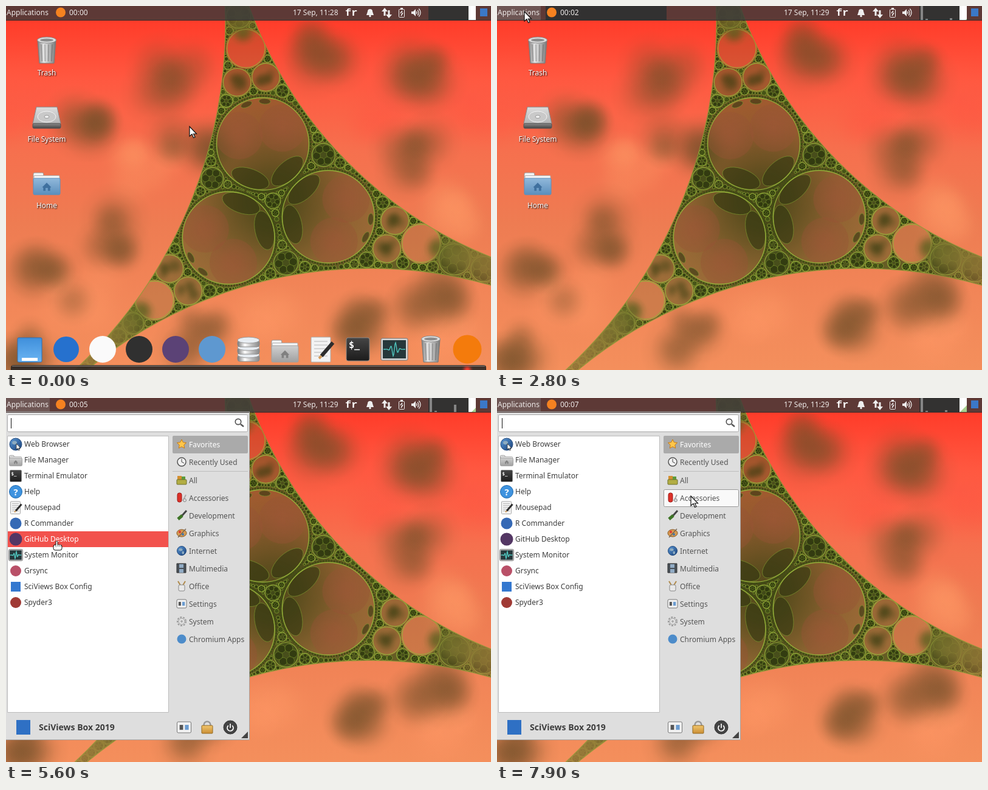
An HTML page with a canvas for the animation above (8000 ms loop, 798 px wide and 598 px high).

```html
<!DOCTYPE html>
<html lang="en">
<head>
<meta charset="utf-8">
<title>Desktop menu</title>
<style>
html, body { margin: 0; width: 100%; height: 100%; overflow: hidden; background: #444; }
canvas { display: block; }
</style>
</head>
<body>
<canvas id="stage" width="798" height="598"></canvas>
<script>
const W = 798, H = 598, LOOP = 8000, STEP = 50, TAU = 2 * Math.PI;
let g = document.getElementById('stage').getContext('2d');

// ---------- helpers ----------
function layer(draw) {
  const canvas = document.createElement('canvas'), previous = g;
  canvas.width = W; canvas.height = H;
  g = canvas.getContext('2d');
  draw();
  g = previous;
  return canvas;
}
function paint(fill, stroke, width = 1) {
  if (fill) { g.fillStyle = fill; g.fill(); }
  if (stroke) { g.strokeStyle = stroke; g.lineWidth = width; g.stroke(); }
}
function rect(x, y, w, h, fill, stroke, r = 0) {
  g.beginPath(); g.roundRect(x, y, w, h, r); paint(fill, stroke);
}
function oval(x, y, rx, ry, fill, stroke, turn = 0, width = 1) {
  g.beginPath(); g.ellipse(x, y, rx, ry, turn, 0, TAU); paint(fill, stroke, width);
}
const disc = (x, y, r, fill, stroke, width) => oval(x, y, r, r, fill, stroke, 0, width);
function arc(x, y, r, from, to, color, width) {
  g.beginPath(); g.arc(x, y, r, from, to); paint(null, color, width);
}
function poly(x, y, points, fill, stroke, width) {
  g.beginPath();
  for (const [px, py] of points) g.lineTo(x + px, y + py);
  g.closePath();
  paint(fill, stroke, width);
}
function line(x0, y0, x1, y1, color, width = 1) {
  g.beginPath(); g.moveTo(x0, y0); g.lineTo(x1, y1); paint(null, color, width);
}
function shade(x0, y0, x1, y1, ...colors) {
  const s = g.createLinearGradient(x0, y0, x1, y1);
  colors.forEach((c, i) => s.addColorStop(i / (colors.length - 1), c));
  return s;
}
const down = (y, h, ...colors) => shade(0, y, 0, y + h, ...colors);
const across = (x, w, ...colors) => shade(x, 0, x + w, 0, ...colors);
function text(str, x, y, color, size = 12, weight = '', align = 'left', family = '"Noto Sans", sans-serif') {
  g.font = `${weight} ${size}px ${family}`;
  g.textAlign = align;
  g.fillStyle = color;
  g.fillText(str, x, y);
}
function glow(x, y, r, rgb, alpha) {
  const s = g.createRadialGradient(x, y, 0, x, y, r);
  for (let i = 0; i <= 4; i++) s.addColorStop(i / 4, `rgba(${rgb},${alpha * (1 + Math.cos(i / 4 * Math.PI)) / 2})`);
  g.fillStyle = s;
  g.fillRect(x - r, y - r, 2 * r, 2 * r);
}
let seed = 7;
const random = () => (seed = seed * 16807 % 2147483647) / 2147483647;
// Irregular soft cloud made of several glows.
function cloud(x, y, spread, rgb, alpha) {
  for (let i = 0; i < 6; i++)
    glow(x + (random() - .5) * 2 * spread, y + (random() - .5) * 1.6 * spread, spread * (.9 + random() * .7), rgb, alpha);
}
const polar = (x, y, angle, d) => [x + Math.cos(angle) * d, y + Math.sin(angle) * d];

// ---------- wallpaper ----------
const edges = [[-414, 30, 775], [1056, -235, 697], [598, 1161, 730]];
const HUB = [439, 320];
const lobes = [-100, 16, 140].map(degrees => {
  const angle = degrees * Math.PI / 180, side = angle + Math.PI / 2;
  const pair = polar(...HUB, angle, 202);
  return {
    angle, side,
    big: [...polar(...HUB, angle, 95), 81],
    small: [[...polar(...pair, side, 24), 24], [...polar(...pair, side, -24), 24], [...polar(...HUB, angle, 254), 33]]
  };
});
const bigs = lobes.map(l => l.big);

// Circle touching three others from outside.
function touching([x1, y1, r1], b, c) {
  const power = ([x, y, r]) => x * x + y * y - r * r;
  const row = o => [2 * (x1 - o[0]), 2 * (y1 - o[1]), 2 * (o[2] - r1), power([x1, y1, r1]) - power(o)];
  const [a2, b2, c2, d2] = row(b), [a3, b3, c3, d3] = row(c);
  const det = a2 * b3 - a3 * b2;
  const p = (d2 * b3 - d3 * b2) / det, q = (c2 * b3 - c3 * b2) / det;
  const s = (a2 * d3 - a3 * d2) / det, u = (a2 * c3 - a3 * c2) / det;
  const P = p - x1, S = s - y1;
  const A = q * q + u * u - 1, B = 2 * (P * q + S * u - r1), C = P * P + S * S - r1 * r1;
  const root = Math.sqrt(B * B - 4 * A * C);
  const r = Math.min(...[2 * C / (-B + root), 2 * C / (-B - root)].filter(v => v > 0));
  return [p + q * r, s + u * r, r];
}
function gasket() {
  const seeds = [...edges, ...bigs, ...lobes.flatMap(l => l.small)];
  const placed = [...seeds], found = [];
  function fill(a, b, c, depth) {
    const n = touching(a, b, c);
    if (!(n[2] > 1.3) || n[2] > 30 || depth > 7) return;
    if (placed.some(o => Math.hypot(n[0] - o[0], n[1] - o[1]) < n[2] + o[2] - .4 * Math.min(n[2], o[2]))) return;
    placed.push(n); found.push(n);
    fill(a, b, n, depth + 1); fill(a, c, n, depth + 1); fill(b, c, n, depth + 1);
  }
  seeds.forEach((a, i) => seeds.slice(i + 1).forEach((b, j) =>
    seeds.slice(i + j + 2).forEach(c => fill(a, b, c, 0))));
  return found;
}
// Dark lens inside one bubble, next to its neighbour.
function lensToward([x, y, r], [nx, ny, nr]) {
  const a = Math.atan2(ny - y, nx - x), size = Math.min(r, nr);
  oval(...polar(x, y, a, r - 7 - size * .17), size * .19, size * .4, 'rgba(48,54,16,.6)', 'rgba(125,150,48,.7)', a);
}
const web = layer(() => {
  const lime = '#94b03a';
  g.fillStyle = 'rgba(78,88,30,.86)';
  g.fillRect(0, 0, W, H);
  g.globalCompositeOperation = 'destination-out';
  for (const [x, y, r] of bigs) disc(x, y, r - 5, 'rgba(0,0,0,.4)');
  for (const { small } of lobes) for (const [x, y, r] of small) disc(x, y, r, r > 30 ? 'rgba(0,0,0,.75)' : 'rgba(0,0,0,.4)');
  g.globalCompositeOperation = 'source-over';

  glow(...HUB, 175, '58,64,18', .75);
  for (const { big, small, angle, side } of lobes) {
    const mid = polar(big[0], big[1], angle, 20);
    for (const d of [-36, 36]) {
      const p = polar(...mid, side, d);
      disc(...p, 39, 'rgba(150,84,54,.4)');
      glow(...p, 44, '160,86,56', .45);
    }
    for (const [x, y, r] of small) {
      if (r < 30) cloud(x, y, r * .5, '48,58,14', .25);
      else glow(...polar(x, y, angle, 28), 24, '58,74,18', .7);
    }
    for (const other of bigs) if (other !== big) lensToward(big, other);
    for (const bubble of small.slice(0, 2)) lensToward(big, bubble);
    g.setLineDash([2.5, 2]);
    disc(big[0], big[1], big[2] - 2.5, null, '#3e4d14', 3);
    g.setLineDash([]);
    disc(big[0], big[1], big[2] - 5, null, lime, 1.4);
    for (const [x, y, r] of small) disc(x, y, r * .95, null, lime, 1.1);
  }
  for (const [x, y, r] of gasket()) {
    disc(x, y, r * .92, r > 7 ? 'rgba(66,76,26,.75)' : 'rgba(46,58,14,.85)', lime, r > 5 ? 1.1 : .7);
    const petals = r > 8 ? 6 : r > 4 ? 3 : 0;
    for (let i = 0; i < petals; i++)
      disc(...polar(x, y, i / petals * TAU + x, r * .55), r * .3, 'rgba(35,45,10,.55)', 'rgba(130,155,50,.8)', .7);
  }
  // Far tips are out of focus and half transparent.
  for (const { angle } of lobes)
    for (let d = 300; d < 440; d += 28) glow(...polar(...HUB, angle, d), 45, '112,118,44', .7);
  g.globalCompositeOperation = 'destination-out';
  const fade = g.createRadialGradient(...HUB, 265, ...HUB, 430);
  fade.addColorStop(0, 'rgba(0,0,0,0)');
  fade.addColorStop(1, 'rgba(0,0,0,.4)');
  g.fillStyle = fade;
  g.fillRect(0, 0, W, H);
  for (const e of edges) disc(...e, '#000');
  g.globalCompositeOperation = 'source-over';
  for (const e of edges) disc(...e, null, 'rgba(140,155,55,.7)', 1.4);
});
const wallpaper = layer(() => {
  g.fillStyle = down(0, H, '#ff3524', '#ff5840', '#f6704e', '#ee7c52', '#f28658', '#f48f5c');
  g.fillRect(0, 0, W, H);
  for (const [x, y] of [[620, 160], [45, 150], [750, 150]]) cloud(x, y, 50, '255,88,66', .3);
  for (const [x, y] of [[720, 530], [440, 515], [120, 480], [750, 335], [230, 270]]) cloud(x, y, 38, '252,148,98', .35);
  for (const [x, y] of [[510, 72], [668, 98], [275, 115], [120, 215], [305, 225], [665, 252], [155, 375],
    [80, 455], [15, 565], [335, 545], [600, 505], [700, 470]]) cloud(x, y, 40, '112,78,40', .34);
  g.drawImage(web, 0, 0);
});

// ---------- icons ----------
const ink = '#3d3d3d';
function house(x, y, s, color) {
  poly(x, y, [[0, -7 * s], [8 * s, s], [-8 * s, s]], color);
  for (const side of [-6, 2]) rect(x + side * s, y, 4 * s, 7 * s, color);
  rect(x - 6 * s, y, 12 * s, 2 * s, color);
}
function folder(x, y, w, h, light, dark) {
  rect(x, y, w * .38, h * .4, '#f4f4f4', '#999', 2);
  rect(x + 1, y + h * .13, w - 2, h * .5, '#f6f6f6', '#aaa', 1);
  rect(x, y + h * .25, w, h * .75, down(y, h, light, dark), dark, 2);
}
function trash(x, y) {
  poly(x, y, [[-15, -16], [15, -16], [12, 21], [-12, 21]], across(x - 14, 28, '#8a8a8a', '#e8e8e8', '#b5b5b5', '#7d7d7d'), '#777');
  for (let i = -9; i <= 9; i += 6) line(x + i, y - 10, x + i * .86, y + 18, 'rgba(80,80,80,.45)', 1.5);
  oval(x, y - 17, 15.5, 5, '#dedede', '#888');
  oval(x, y - 17, 11, 2.5, '#8c8c8c');
}
function drive(x, y) {
  poly(x, y, [[-17, -17], [17, -17], [23, 10], [-23, 10]], down(y - 17, 27, '#ddd', '#b5b5b5'), '#888');
  rect(x - 23, y + 10, 46, 8, down(y + 10, 8, '#8a8a8a', '#444'), '#555', 2);
  oval(x, y - 1, 15, 9, '#c9c9c9', '#f3f3f3');
  oval(x, y - 1, 4, 2.5, '#eee', '#999');
}
function database(x, y) {
  for (let top = y + 9; top >= y - 15; top -= 12) {
    rect(x - 18, top, 36, 11, across(x - 18, 36, '#777', '#fff', '#bbb', '#888'), '#8a8a8a', 4);
    oval(x, top, 18, 5, '#e8edf2', '#999');
  }
}
function notepad(x, y, s = 1) {
  rect(x - 17 * s, y - 20 * s, 32 * s, 41 * s, '#f3f3f3', '#aaa', 1);
  for (let i = -13; i < 16; i += 6) line(x - 12 * s, y + i * s, x + 10 * s, y + i * s, '#b5b5b5');
  line(x + 19 * s, y - 11 * s, x, y + 11 * s, '#2d2d2d', 6 * s);
  line(x, y + 11 * s, x - 4 * s, y + 15 * s, '#d49a57', 4 * s);
}
function terminal(x, y, s = 1) {
  rect(x - 19 * s, y - 19 * s, 38 * s, 38 * s, down(y - 19 * s, 38 * s, '#454545', '#1c1c1c'), '#888', 3 * s);
  text('$_', x - 15 * s, y - 2 * s, '#fff', Math.max(7, 15 * s), 'bold', 'left', '"DejaVu Sans Mono", monospace');
}
function monitor(x, y, s = 1) {
  rect(x - 22 * s, y - 18 * s, 44 * s, 36 * s, '#d5d5d5', '#777', 2);
  rect(x - 19 * s, y - 15 * s, 38 * s, 30 * s, '#26383b');
  g.beginPath();
  for (let i = -18; i <= 18; i++) g.lineTo(x + i * s, y - 12 * s * Math.sin(i * .8) * Math.exp(-i * i / 40));
  paint(null, '#50c8c0', 1.4);
}
function globe(x, y, r) {
  disc(x, y, r, shade(x - r, y - r, x + r, y + r, '#5c9ad8', '#183f78'), '#234a7c');
  oval(x - r * .2, y - r * .25, r * .4, r * .3, '#8dabc0');
  oval(x + r * .3, y + r * .4, r * .25, r * .35, '#8dabc0');
}
function panelBox(x, y, w, h) {
  rect(x - w / 2, y - h / 2, w, h, '#f1f1f1', '#777', 2);
  rect(x - w * .32, y - h * .22, w * .25, h * .45, '#555');
  rect(x + w * .06, y - h * .22, w * .27, h * .45, '#6a9bd0');
}
function star(x, y, r) {
  const tips = Array.from({ length: 10 }, (_, i) => polar(0, 0, i * TAU / 10 - TAU / 4, i % 2 ? r * .5 : r));
  poly(x, y, tips, '#ffc64a', '#c67a18');
}
function greyFolder(x, y, s) {
  folder(x - 22 * s, y - 16 * s, 44 * s, 36 * s, '#e0e0e0', '#a0a0a0');
  house(x, y + 7 * s, s * .9, '#808080');
}
const badge = (r, color) => (x, y) => disc(x, y, r, color);

const apps = [
  ['Web Browser', (x, y) => { globe(x, y, 10); arrow(x + 1, y - 1, .6); }],
  ['File Manager', (x, y) => greyFolder(x, y, .48)],
  ['Terminal Emulator', (x, y) => terminal(x, y, .5)],
  ['Help', (x, y) => { disc(x, y, 10.5, '#3f93df', '#226cae'); text('?', x, y + 6, '#fff', 15, 'bold', 'center'); }],
  ['Mousepad', (x, y) => notepad(x, y, .5)],
  ['R Commander', badge(9.5, '#3569b5')],
  ['GitHub Desktop', badge(10.5, '#543764')],
  ['System Monitor', (x, y) => monitor(x, y, .52)],
  ['Grsync', badge(9, '#b95068')],
  ['SciViews Box Config', (x, y) => rect(x - 8, y - 8, 16, 16, '#3478cf')],
  ['Spyder3', badge(9, '#a03a35')]
];
const categories = [
  ['Favorites', (x, y) => star(x, y, 8)],
  ['Recently Used', (x, y) => { disc(x, y, 7, '#f1f1f1', '#555', 1.5); line(x, y - 5, x, y, '#444'); line(x, y, x + 4, y + 2, '#444'); }],
  ['All', (x, y) => { rect(x - 7, y - 7, 7, 8, '#d48f30'); rect(x, y - 6, 6, 7, '#5b9b3d'); rect(x - 8, y - 1, 16, 8, '#b2ad43', '#6d702c', 1); }],
  ['Accessories', (x, y) => { rect(x - 7, y - 8, 7, 15, '#dc3028', '#9d1d1a', 3); line(x + 2, y + 5, x + 7, y - 5, '#aaa', 2); disc(x + 5, y + 4, 2.5, '#ddd', '#888'); }],
  ['Development', (x, y) => { line(x + 8, y - 8, x, y + 1, '#444', 3); line(x + 1, y, x - 6, y + 6, '#3d7425', 5); }],
  ['Graphics', (x, y) => { oval(x, y, 8, 6, '#d79c52', '#875723'); disc(x - 3, y - 2, 2, '#d33'); disc(x + 2, y + 2, 2, '#47a'); line(x - 6, y + 7, x + 7, y - 7, '#765', 1.5); }],
  ['Internet', (x, y) => globe(x, y, 7.5)],
  ['Multimedia', (x, y) => { rect(x - 8, y - 8, 15, 15, '#495057', '#333'); for (const d of [-7, 1]) rect(x - 4, y + d, 7, 6, '#91abc4'); }],
  ['Office', (x, y) => { for (const d of [-6, 6]) line(x + d, y - 8, x, y + 2, '#b08a4a', 2); rect(x - 5, y - 2, 10, 10, '#e8e8e8', '#888', 2); }],
  ['Settings', (x, y) => panelBox(x, y, 16, 14)],
  ['System', (x, y) => { g.setLineDash([3, 2]); disc(x, y, 7, null, '#999', 2); g.setLineDash([]); disc(x, y, 5, '#e4e4e4', '#999'); disc(x, y, 2, '#aaa'); }],
  ['Chromium Apps', badge(7.5, '#4d8cca')]
];
const launchers = [
  (x, y) => { rect(x - 20, y - 19, 40, 40, down(y - 19, 40, '#3f8fdb', '#6bb5f3'), '#2d6fb2', 2); rect(x - 13, y + 14, 26, 5, '#fff'); },
  badge(21, '#2671ce'), badge(22, '#fafafa'), badge(22, '#303030'), badge(22, '#5b4276'), badge(22, '#5e98d0'),
  database, (x, y) => greyFolder(x, y + 1, 1), notepad, terminal, monitor, trash, badge(23.5, '#f47b0c')
];

// ---------- desktop ----------
const desktop = layer(() => {
  g.drawImage(wallpaper, 0, 0);
  trash(67, 73);
  drive(67, 183);
  folder(45, 274, 44, 36, '#a3c6e4', '#5b8fbd');
  house(67, 297, .95, '#3f709f');
  g.shadowColor = '#000'; g.shadowBlur = 2; g.shadowOffsetX = g.shadowOffsetY = 1;
  ['Trash', 'File System', 'Home'].forEach((name, i) => text(name, 67, 114 + i * 109, '#fff', 12, '', 'center'));
});
const dock = layer(() => {
  rect(8.5, 590.5, 781, 14, 'rgba(45,40,38,.9)', '#292420', 3);
  line(10, 591.5, 788, 591.5, '#918983');
  glow(759, 598, 10, '255,60,45', 1);
  launchers.forEach((icon, i) => icon(39 + i * 60, 564));
});

// ---------- panel ----------
const CUT = 2800, OPEN = 3750;
function trayArrow(x, y, dir, color) {
  poly(x, y, [[0, -8 * dir], [5, -2 * dir], [-5, -2 * dir]], color);
  line(x, y - 2 * dir, x, y + 5 * dir, color, 3);
}
function tray(color) {
  g.beginPath(); g.arc(599, 9, 4, Math.PI, TAU); g.lineTo(605, 15); g.lineTo(593, 15); paint(color);
  disc(599, 16.5, 1.7, color);
  trayArrow(623, 11, 1, color);
  trayArrow(630, 12, -1, color);
  rect(646.5, 5.5, 9, 13, null, color, 1);
  rect(649, 3, 4, 2, color);
  line(652, 8, 649, 12, color, 1.5);
  line(653, 11, 650, 16, color, 1.5);
  rect(667, 9, 3, 4, color);
  poly(670, 11, [[0, -2], [4, -6], [4, 6], [0, 2]], color);
  for (const r of [3, 6, 9]) arc(673, 11, r, -.8, .8, color, 1.3);
}
function panel(t) {
  const later = t >= CUT, pale = '#eeeae8';
  rect(0, 0, W, 24, 'rgba(58,58,58,.82)');
  rect(0, 23, W, 1, 'rgba(40,30,30,.6)');
  if (later) rect(0, 0, 72, 23, 'rgba(140,140,140,.35)');
  if (later && t < 3050) rect(80, 0, 199, 23, t < 3000 ? '#323131' : 'rgba(50,49,49,.5)');
  text('Applications', 1, 15, pale);
  disc(90, 10.5, 8, '#f58220');
  text('00:0' + (later ? Math.floor(t / 1000) : 0), 104, 15, pale);
  text('17 Sep, 11:' + (later ? 29 : 28), 472, 15, pale);
  text('fr', 558, 16, '#fff', 17, 'bold', 'left', '"Liberation Mono", monospace');
  tray('#eee');
  rect(695, 0, 66, 23, '#333231');
  const meter = (core, h) => rect(697 + core * 8, 23 - h, 4, h, '#858585');
  if (later) { meter(0, 23); meter(1, 2); }
  const busyCore = !later ? 4 : t < 3300 ? 6 : 5;
  if (t >= 750) meter(busyCore, t >= 5200 && t < 6050 ? 12 : 3);
  rect(761, 0, 12, 23, '#fff');
  if (later) {
    const d = 2 + (t - CUT) / 560;
    poly(773, 23, [[0, 0], [-d, 0], [0, -d]], '#a9d08f');
  }
  rect(780, 4, 12, 13, '#3b78c8');
}

// ---------- menu ----------
const menu = layer(() => {
  rect(0, 24, 401, 538, '#dedede');
  rect(-2.5, 22.5, 403, 539, null, '#a5a5a5');
  rect(2.5, 27.5, 395, 28, '#fff', '#aaa', 2);
  rect(8, 33, 1, 17, '#111');
  disc(382, 39, 4.7, null, '#555', 1.7);
  line(386, 43, 391, 47, '#555', 2.4);
  rect(2.5, 62.5, 265, 454, '#fff', '#bcbcbc');
  rect(274, 62, 124, 29, '#aaa', null, 2);
  line(274, 120.5, 398, 120.5, '#bdbdbd');
  rect(17, 529, 23, 24, '#2f70c4');
  text('SciViews Box 2019', 54, 546, ink, 14, 'bold');
  panelBox(293, 541, 23, 18);
  disc(331, 537, 5.5, null, '#999', 2.5);
  rect(322, 538, 18, 13, down(538, 13, '#f2c66c', '#c98e35'), '#94691f', 1);
  disc(369, 541, 11, '#444', '#333');
  arc(369, 542, 5, -.9, 4.04, '#fff', 1.7);
  line(369, 535, 369, 542, '#fff', 1.7);
  poly(398, 559, [[0, -11], [0, 0], [-11, 0]], '#444');
});
const rowAt = (x, y) => x > 2 && x < 268 && y >= 62 ? Math.floor((y - 62) / 26) : -1;
function drawMenu(x, y) {
  g.drawImage(menu, 0, 0);
  const hot = rowAt(x, y);
  apps.forEach(([name, icon], i) => {
    const cy = 75 + i * 26;
    if (i === hot) rect(3, cy - 12, 264, 26, '#f2524d');
    icon(16, cy + 1);
    text(name, 30, cy + 5, i === hot ? '#fff' : ink);
  });
  categories.forEach(([name, icon], i) => {
    const cy = 76 + i * 29 + (i > 1);
    if (i && x > 273 && x < 399 && Math.abs(y - cy) < 14.5) rect(274.5, cy - 13.5, 123, 28, '#f9f9f9', '#999', 2);
    icon(289, cy);
    text(name, 301, cy + 5, i ? '#555' : '#fff');
  });
}

// ---------- pointer ----------
const track = [
  [550, 302, 198], [900, 148, 151], [1200, 75, 20], [CUT - STEP, 75, 20], [CUT, 45, 9], [4500, 45, 9],
  [5600, 84, 235], [6300, 112, 333], [6700, 112, 333], [7700, 319, 161]
];
function pointerAt(t) {
  const next = track.findIndex(k => k[0] > t);
  if (next < 1) return track.at(next).slice(1);
  const [t0, x0, y0] = track[next - 1], [t1, x1, y1] = track[next];
  const p = (t - t0) / (t1 - t0);
  return [Math.round(x0 + (x1 - x0) * p), Math.round(y0 + (y1 - y0) * p)];
}
function arrow(x, y, s = 1) {
  const shape = [[0, 0], [0, 16], [4, 12.5], [6.5, 18.5], [9, 17.5], [6.5, 12], [11.5, 12]];
  poly(x, y, shape.map(([px, py]) => [px * s, py * s]), '#fff', '#111', 1.2 * s);
}
function hand(x, y) {
  rect(x - 6, y + 6, 14, 9, '#fff', '#111', 3);
  rect(x - 2, y, 3, 10, '#fff', '#111', 1.5);
  rect(x - 1.5, y + 6, 8, 7, '#fff');
  for (let i = 1; i < 7; i += 2.5) line(x + i, y + 6, x + i, y + 9, '#333', .8);
}

function draw(t) {
  const [x, y] = pointerAt(t), open = t >= OPEN;
  g.drawImage(desktop, 0, 0);
  if (t < CUT) g.drawImage(dock, 0, 0);
  panel(t);
  if (open) {
    g.globalAlpha = Math.min(1, (t - OPEN + STEP) / 300);
    drawMenu(x, y);
    g.globalAlpha = 1;
  }
  const row = open ? rowAt(x, y) : -1;
  (apps[row] ? hand : arrow)(x, y);
}
function tick() {
  draw(Math.floor(performance.now() % LOOP / STEP) * STEP);
  requestAnimationFrame(tick);
}
tick();
</script>
</body>
</html>
```
